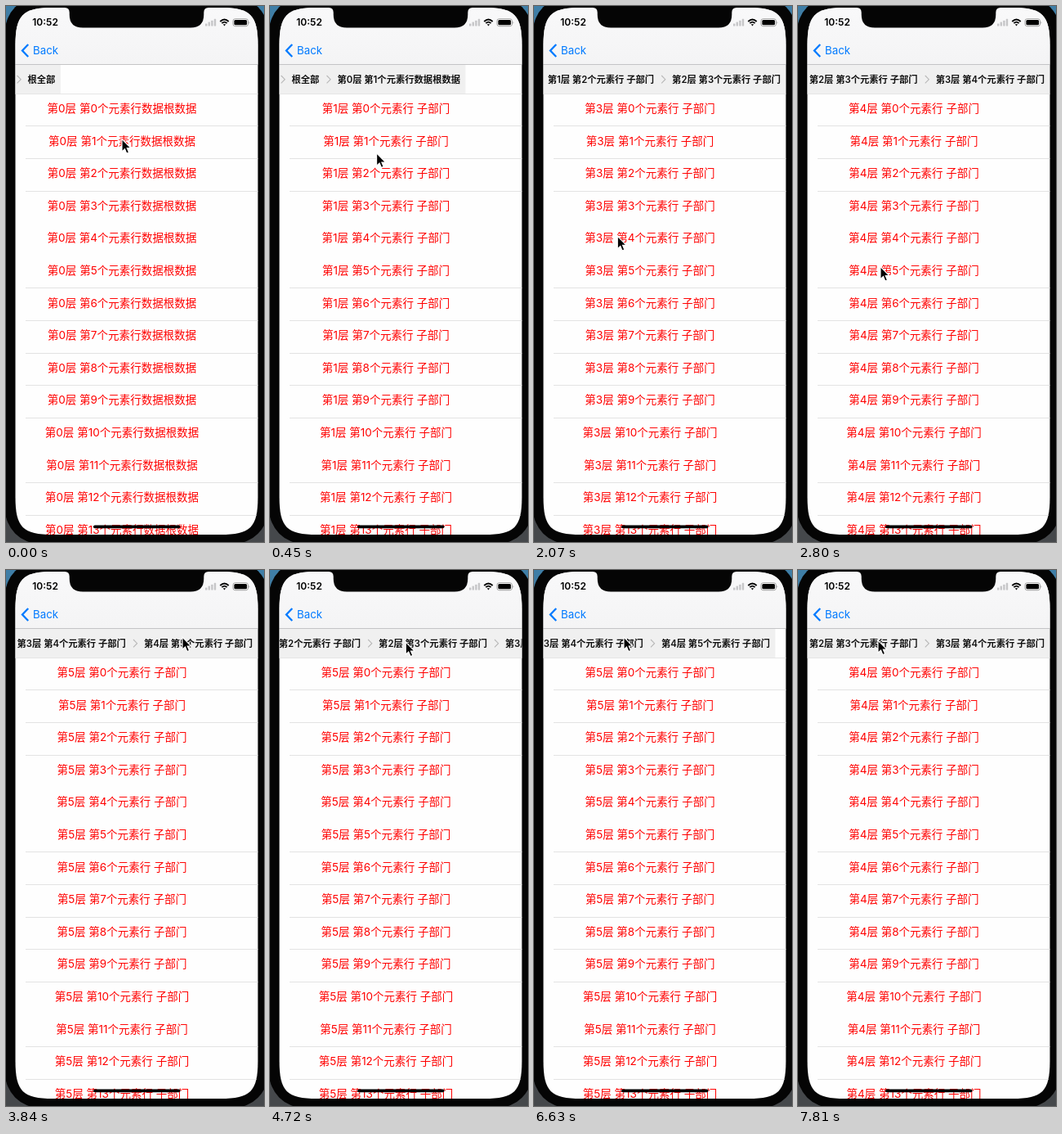
These frames come from a looping animation (316x655 px, 8 s). An HTML page:

```html
<!DOCTYPE html>
<html lang="zh-CN">
<head>
<meta charset="utf-8">
<style>
  html, body { margin: 0; width: 100%; height: 100%; overflow: hidden; background: #000; }
  svg { display: block; width: 316px; height: 655px; }
  text { font-family: Inter, "Noto Sans CJK SC", "Noto Sans CJK", sans-serif; }
  .row { font-size: 13.5px; fill: #ff0000; text-anchor: middle; }
  .crumb { font-size: 11.3px; font-weight: 600; fill: #111; }
</style>
</head>
<body>
<svg viewBox="0 0 316 655" xmlns="http://www.w3.org/2000/svg">
  <defs>
    <clipPath id="screen">
      <path d="M11.5 48 C11.5 11 20.5 2 57.5 2 H262.5 C299.5 2 308.5 11 308.5 48
               V600 C308.5 637 299.5 646 262.5 646 H57.5 C20.5 646 11.5 637 11.5 600Z"/>
    </clipPath>
    <linearGradient id="desk" x2="0" y2="1">
      <stop stop-color="#3f7fa8"/><stop offset=".4" stop-color="#45484b"/>
    </linearGradient>
    <linearGradient id="nav" x2="0" y2="1">
      <stop stop-color="#f9f9fa"/><stop offset="1" stop-color="#f4f4f5"/>
    </linearGradient>
  </defs>
  <rect width="316" height="655" fill="url(#desk)"/>
  <rect x="-1" y="-11" width="322" height="668" rx="42" fill="#050505"/>
  <g clip-path="url(#screen)">
    <rect width="316" height="655" fill="#fefefe"/>
    <g id="list"></g>
    <rect x="11" y="107" width="298" height="1" fill="#e6e6e6"/>
    <g id="crumbs"></g>
    <rect width="316" height="71" fill="url(#nav)"/>
    <rect y="71" width="316" height="1" fill="#c4c4c6"/>
    <path d="M72 0 H248 V2 Q242.3 2 242.3 8 V10.5 Q242.3 26.5 226 26.5 H94 Q77.7 26.5 77.7 10.5 V8 Q77.7 2 72 2Z" fill="#050505"/>
    <text x="32.3" y="24.4" font-size="12" font-weight="600">10:52</text>
    <g id="signal" fill="#c6c6c8"></g>
    <g fill="none" stroke="#000" stroke-width="1.9">
      <path d="M262.3 19 Q267.5 13.8 272.7 19M264.4 21.2 Q267.5 18 270.6 21.2"/>
      <path d="M265.8 22.3 L267.5 24.4 269.2 22.3Z" fill="#000" stroke="none"/>
    </g>
    <rect x="278" y="15.7" width="18.5" height="9" rx="2.7" fill="#fff" stroke="#8b8b8b" stroke-width=".8"/>
    <rect x="279.4" y="17.1" width="15.7" height="6.2" rx="1.5"/>
    <path d="M297.6 18.5 q1.6 1.7 0 3.4z" fill="#888"/>
    <path d="M27.2 47 L20 54.5 27.2 62" fill="none" stroke="#007aff" stroke-width="2.3"/>
    <text x="33" y="59.2" font-size="13.3" fill="#007aff">Back</text>
    <rect x="107" y="634.4" width="106.5" height="3.8" rx="1.9"/>
  </g>
  <path id="cursor" d="M0 0 V15.2 L3.5 12 5.8 17.5 8.5 16.4 6.2 11 H10.8Z" stroke="#fff" stroke-width="1.1"/>
</svg>
<script>
// All times are counted in beats, the rate at which the picture refreshes.
const LOOP = 8000, BEAT = 147.3;
const LEFT = 11, RIGHT = 308.5, ROW = 39.6;
const MOVE = 4, BACK = 53;
const taps = [2, 6, 10, 16, 21];
const deepest = taps.length;

const $ = id => document.getElementById(id);
const clamp = u => Math.min(1, Math.max(0, u));
const mix = (a, b, u) => a + (b - a) * u;
const easeOut = u => 1 - (1 - u) ** 2;
const smooth = (from, to, t) => {
  const u = clamp((t - from) / (to - from));
  return u * u * (3 - 2 * u);
};

function add(parent, tag, attrs, text = '') {
  const el = document.createElementNS('http://www.w3.org/2000/svg', tag);
  for (const key in attrs) el.setAttribute(key, attrs[key]);
  el.textContent = text;
  return parent.appendChild(el);
}

const label = (level, row) =>
  `第${level}层 第${row}个元素行${level ? ' 子部门' : '数据根数据'}`;

// Pointer moves: departure beat and destination.
const overRow = n => ({ x: 100 + 42 * 0.38 ** (n - 1), y: 123 + ROW * n });
const moves = [
  { at: -MOVE, ...overRow(1) },
  ...taps.slice(0, -1).map((at, i) => ({ at, ...overRow(i + 2) })),
  { at: 21, x: 212, y: 57 },
  { at: 24, x: 216, y: 82 },
  { at: 26, x: 130, y: 87 },
  { at: 29, x: 215, y: 88 },
  { at: 31, x: 150, y: 88 },
  { at: 33, x: 257, y: 85 },
  { at: 38, x: 110, y: 82 },
  { at: 45, x: 98, y: 86 }
];

function pointer(t) {
  const i = moves.filter(m => m.at <= t).length - 1;
  const to = moves[i], from = moves[i - 1] || to, next = moves[i + 1];
  const span = next ? Math.min(MOVE, next.at - to.at) : MOVE;
  const u = easeOut(clamp((t - to.at) / span));
  return [mix(from.x, to.x, u), mix(from.y, to.y, u)];
}

// Swipe to the start, swipe past the end, spring back.
function swiped(t, end) {
  const over = 13;
  return end * (1 - smooth(28, 36, t))
    + (end + over) * smooth(36.7, 45, t)
    - over * easeOut(clamp((t - 45) / 4));
}

for (let i = 0; i < 4; i++) {
  const rise = i * 1.9;
  add($('signal'), 'rect', { x: 244 + i * 3.6, y: 21.5 - rise, width: 2.4, height: 3 + rise, rx: .6 });
}

const hairlineLost = i => i === 3 || i === 4 || i === 10;
const rows = Array.from({ length: 14 }, (_, i) => {
  if (!hairlineLost(i))
    add($('list'), 'rect', { x: 24, y: Math.round(106.7 + (i + 1) * ROW), width: 285, height: 1, fill: '#e3e3e3' });
  return add($('list'), 'text', { class: 'row', x: 142, y: 130 + i * ROW });
});

const bar = add($('crumbs'), 'rect', { y: 72, height: 35, fill: '#f0f0f0' });
let length = 0;
const crumbs = Array.from({ length: deepest + 1 }, (_, i) => {
  const g = add($('crumbs'), 'g', {});
  add(g, 'path', { d: 'M2.6 85 L7.2 89.7 2.6 94.4', fill: 'none', stroke: '#b8b8b8', 'stroke-width': 1.1 });
  const name = add(g, 'text', { class: 'crumb', x: 15.5, y: 93.7 }, i ? label(i - 1, i) : '根全部');
  const start = length;
  length += name.getComputedTextLength() + 22;
  return { g, start, end: length };
});

let shown = -1;
function showLevel(level) {
  if (level === shown) return;
  shown = level;
  rows.forEach((el, i) => el.textContent = label(level, i));
  crumbs.forEach(({ g }, i) => g.setAttribute('display', i <= level ? 'inline' : 'none'));
}

function draw(time) {
  const t = Math.floor((time + 5) / BEAT);
  const level = taps.filter(at => at <= t).length - (t >= BACK);
  showLevel(level);

  const total = crumbs[level].end;
  const end = Math.max(0, total - (RIGHT - LEFT));
  const left = LEFT - (level === deepest ? swiped(t, end) : end);
  bar.setAttribute('x', left);
  bar.setAttribute('width', total);
  for (const { g, start } of crumbs) g.setAttribute('transform', `translate(${left + start} 0)`);

  $('cursor').setAttribute('transform', `translate(${pointer(t).join(' ')})`);
}

const begin = performance.now();
function tick() {
  draw((performance.now() - begin) % LOOP);
  requestAnimationFrame(tick);
}
tick();
</script>
</body>
</html>
```
